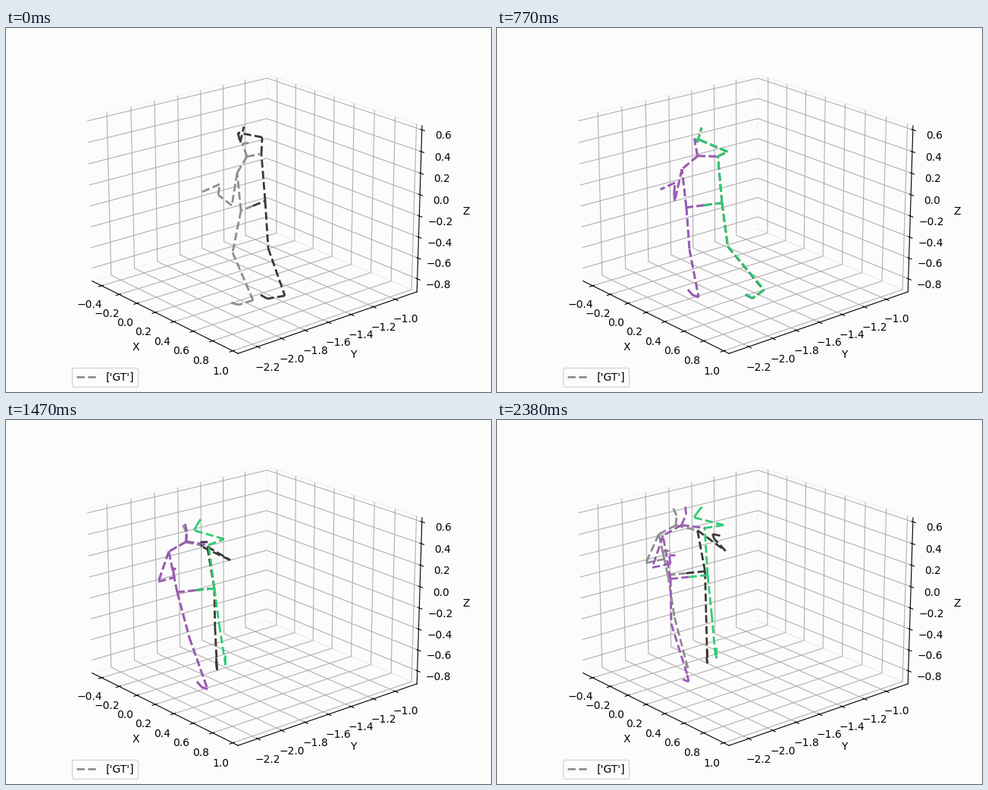
A matplotlib script that plays this animation: 640x480 px, repeating every 2.45 s.

```python
import numpy as np
import matplotlib.pyplot as plt
from matplotlib.animation import FuncAnimation
from matplotlib.lines import Line2D

W, H = 640, 480
FRAMES, STEP = 35, 70
PRED_START = 10
PAPER = "#fcfcfc"
GT_COLORS = ("#8e8e8e", "#383838")
PRED_COLORS = ("#9b59b6", "#2ecc71")


def unit(t, t0, t1):
    return np.clip((t - np.asarray(t0)) / np.subtract(t1, t0), 0, 1)


def smooth(t, t0, t1):
    s = unit(t, t0, t1)
    return s * s * (3 - 2 * s)


def settle(t, t0, t1):
    return 1 - (1 - unit(t, t0, t1)) ** 2


def pulse(t, centre, width):
    return np.exp(-((t - centre) / width) ** 2)


def pose(t, predicted=False):
    """Limb joints in pixels; a prediction slowly drifts off the true walk."""

    def swing(start, end, t0, t1, ease=smooth):
        return np.array(start) + np.subtract(end, start) * ease(t, t0, t1)

    def drift(dx, dy, t0=PRED_START, t1=25):
        return predicted * np.array([dx, dy]) * smooth(t, t0, t1)

    # Pelvis: slows down while walking, then rises.
    root = np.array([250 + 76 * max(1 - t / 22, 0) ** 1.7,
                     234.5 - 32.5 * max((t - 8) / 26, 0) ** 1.7])
    root = root + drift(3.5, 5, 20, 34)
    half = swing((16, -6.5), (24.5, -2.5), 0, 14)
    l_hip, r_hip = root - half, root + half

    # Left foot lands, stays planted and lifts off at the end.
    l_ankle = (swing((326, 359), (266, 355), 0, 9, settle)
               + swing((0, 0), (-15, -31), 25, 34) + drift(0, 12, 25, 34))
    l_foot = (swing((307, 365), (258, 352), 0, 9, settle)
              + swing((0, 0), (-6, -25), 27, 34) + drift(1, 18, 27, 34))
    l_toe = (swing((296, 362), (252, 345), 0, 9, settle)
             + swing((0, 0), (-3, -23), 28, 34) + drift(-4, 20, 28, 34))
    l_knee = ((l_hip + l_ankle) / 2 + swing((-19, -4), (-4, -4), 0, 9, settle)
              + drift(-6, 0, 25, 34))

    # Right foot pushes off and swings forward.
    r_ankle = (swing((368, 353), (277.5, 321), (7, 10), (22, 27))
               - [0, 7 * pulse(t, 11, 3)] + drift(11, -7, t1=17))
    r_foot = swing((345, 357), (276.5, 313), (8, 10), (22, 26)) + drift(12, -3, t1=17)
    r_toe = r_foot + swing((-9, -5), (0, -10), 11, 20)
    r_knee = ((r_hip + r_ankle) / 2 + swing((-9, 0), (0, -3), 13, 23)
              - [11 * pulse(t, 11, 4), 0])

    l_shoulder = l_hip + swing((-5, -50), (-12, -54), 7, 25) + drift(2, -3, 20, 34)
    r_shoulder = r_hip + swing((-5, -62), (-10, -54), 8, 25) + drift(6, -8, 14, 34)
    neck = (l_shoulder + r_shoulder) / 2 + [-3, -9]
    head = neck + swing((-6, -17), (1, -13), 0, 25) + drift(5, -1, 20, 34)
    crown = head + swing((8, -1), (-5, -11), 0, 25, settle) + drift(4, 0, 17, 25)

    l_elbow = l_shoulder + swing((-7, 43), (-17, 38), 0, 34) + drift(3, 4, 22, 34)
    l_wrist = l_elbow + swing((-18, -14), (24, -5), 0, 25)
    l_hand = l_wrist + swing((2, -14), (-2, -12), 8, 17)
    l_tip = l_hand + swing((-23, 10), (8, 0), 7, 25)

    # The true right arm drops; the predicted one stays raised.
    r_elbow = r_shoulder + swing((1, -22), (37, 27), 0, 29) + drift(-12, -31)
    r_wrist = (r_elbow + swing((-32, -6), (-41, -18), 0, 13)
               + swing((0, 0), (26, 2), 17, 34)
               + drift(-26, -2, 17, 34) + drift(2, 8))
    r_hand = r_wrist + swing((3, 13), (-2, -6), 5, 18) + drift(6, 0)
    r_tip = r_hand + swing((5, -21), (10, 2), 8, 24) + drift(-2, -12, t1=20)

    return [
        (0, [root, l_hip, l_knee, l_ankle, l_foot, l_toe]),
        (1, [root, r_hip, r_knee, r_ankle, r_foot, r_toe]),
        (0, [l_hip, l_shoulder]),
        (1, [r_hip, r_shoulder]),
        (0, [neck, head, crown]),
        (0, [neck, l_shoulder, l_elbow, l_wrist, l_hand, l_tip]),
        (0, [neck, r_shoulder]),
        (1, [r_shoulder, r_elbow, r_wrist, r_hand, r_tip]),
    ]


def bones(chains):
    """Segments as (start, end, side); side 0 is left, 1 is right."""
    return [(p, q, side) for side, c in chains for p, q in zip(c[:-1], c[1:])]


fig = plt.figure(figsize=(W / 100, H / 100), dpi=100, facecolor=PAPER)

ax = fig.add_axes([0, 0, 1, 1], projection="3d", facecolor=PAPER)
ax.view_init(elev=20, azim=-40)
span = 1.5 * 25 / 24
ax.set_xlim3d(-0.5107, -0.5107 + span)
ax.set_ylim3d(-2.3604, -2.3604 + span)
ax.set_zlim3d(0.6373 - span, 0.6373)
ax.set_yticks(np.linspace(-2.2, -1.0, 7))
for axis, name in ((ax.xaxis, "X"), (ax.yaxis, "Y"), (ax.zaxis, "Z")):
    axis.pane.fill = False
    axis.set_label_text(name)
ax.legend(handles=[Line2D([], [], color=GT_COLORS[0], lw=2, ls="--", label="['GT']")],
          loc="lower left", facecolor=PAPER)

stage = fig.add_axes([0, 0, 1, 1], xlim=(0, W), ylim=(H, 0))
stage.axis("off")


def make_lines(colors):
    return [stage.plot([], [], ls="--", lw=2, color=colors[side])[0]
            for _, _, side in bones(pose(0))]


gt_lines = make_lines(GT_COLORS)
pred_lines = make_lines(PRED_COLORS)


def place(lines, chains):
    for line, (p, q, _) in zip(lines, bones(chains)):
        line.set_data([p[0], q[0]], [p[1], q[1]])


def update(i):
    place(gt_lines, pose(i))
    place(pred_lines, pose(i, predicted=True))
    for line in pred_lines:
        line.set_visible(i >= PRED_START)
    return gt_lines + pred_lines


anim = FuncAnimation(fig, update, frames=FRAMES, interval=STEP,
                     init_func=lambda: update(0), repeat=True)
plt.show()
```
